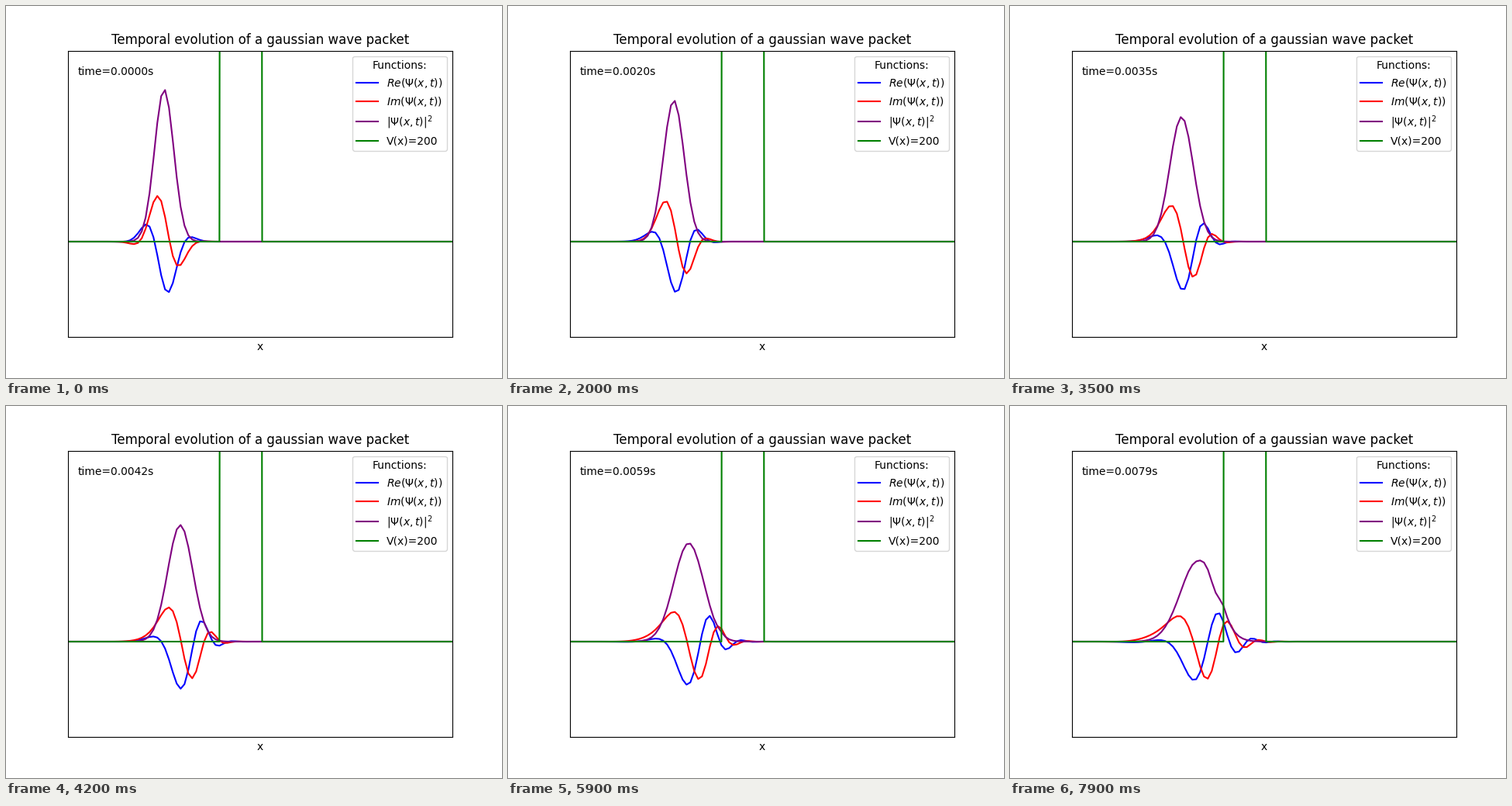
Write a matplotlib script that moves like this. It is 640 px wide and 480 px high and loops after 8000 ms.

```python
import numpy as np
import matplotlib.pyplot as plt
from matplotlib.animation import FuncAnimation

N, FRAMES, DT = 100, 80, 1e-4
X0, SIGMA, K0, V0 = -0.5, 0.05, 20, 200

x = np.linspace(-1, 1, N)
dx = x[1] - x[0]
k = 2 * np.pi * np.fft.fftfreq(N, dx)
V = np.where((x > -0.2) & (x < 0), V0, 0)

# Split-step propagators (hbar = m = 1)
half_v = np.exp(-0.5j * V * DT)
kinetic = np.exp(-0.5j * k**2 * DT)


def evolve(psi):
    return half_v * np.fft.ifft(kinetic * np.fft.fft(half_v * psi))


psi = (2 * np.pi * SIGMA**2) ** -0.25 * np.exp(
    -((x - X0) ** 2) / (4 * SIGMA**2) + 1j * K0 * x)
states = [psi]
for _ in range(FRAMES - 1):
    states.append(evolve(states[-1]))

fig, ax = plt.subplots(figsize=(6.4, 4.8), dpi=100)
ax.set(xlim=(-1, 1), ylim=(-5, 10), xticks=[], yticks=[], xlabel="x",
       title="Temporal evolution of a gaussian wave packet")

re_line, = ax.plot(x, psi.real, color="blue", label=r"$Re(\Psi(x,t))$")
im_line, = ax.plot(x, psi.imag, color="red", label=r"$Im(\Psi(x,t))$")
prob_line, = ax.plot(x, abs(psi) ** 2, color="purple",
                     label=r"$|\Psi(x,t)|^2$")
ax.plot(x, V, color="green", label=f"V(x)={V0}")
ax.legend(title="Functions:", loc="upper right")
clock = ax.text(0.025, 0.915, "", transform=ax.transAxes)


def update(i):
    psi = states[i]
    re_line.set_ydata(psi.real)
    im_line.set_ydata(psi.imag)
    prob_line.set_ydata(abs(psi) ** 2)
    clock.set_text(f"time={i * DT:.4f}s")
    return re_line, im_line, prob_line, clock


anim = FuncAnimation(fig, update, frames=FRAMES, interval=100, repeat=True)
plt.show()
```
